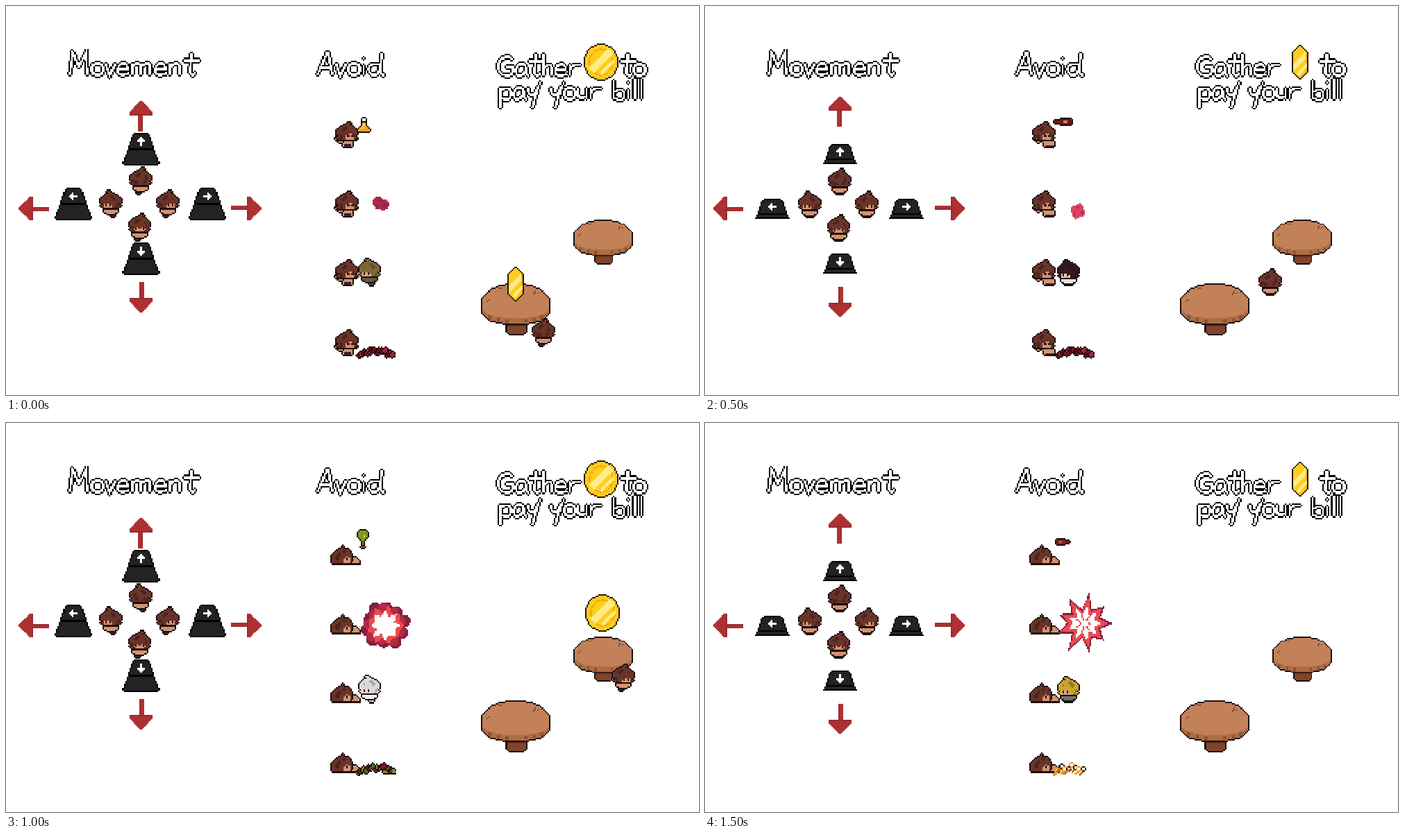
Write an HTML page with a canvas that moves like this. It is 998 px wide and 561 px high and loops after 1600 ms.

```html
<!DOCTYPE html>
<html lang="en">
<head>
<meta charset="utf-8">
<title>How to play</title>
<style>
  html, body { margin: 0; width: 100%; height: 100%; overflow: hidden; background: #fff; }
  canvas { display: block; }
</style>
</head>
<body>
<canvas id="stage" width="998" height="561">Movement. Avoid. Gather coins to pay your bill.</canvas>
<script>
const stage = document.getElementById('stage').getContext('2d');
const PIXEL = 998 / 480, STEP = 100, STEPS = 16;

// Rasterises vector layers [path, fill, edge, lineWidth] into hard pixels.
function sprite(w, h, layers) {
  const canvas = document.createElement('canvas');
  canvas.width = w;
  canvas.height = h;
  const g = canvas.getContext('2d');
  for (const [shape, fill, edge, line] of layers) {
    const path = new Path2D(shape), mask = new Uint8Array(w * h);
    const at = (x, y) => x >= 0 && x < w && mask[y * w + x];
    g.lineWidth = line || 1;
    for (let i = 0; i < w * h; i++) {
      const x = i % w + .5, y = Math.floor(i / w) + .5;
      mask[i] = line ? g.isPointInStroke(path, x, y) : g.isPointInPath(path, x, y);
    }
    for (let i = 0; i < w * h; i++) {
      const x = i % w, y = Math.floor(i / w);
      const near = at(x - 1, y) || at(x + 1, y) || at(x, y - 1) || at(x, y + 1);
      g.fillStyle = mask[i] ? fill : edge;
      if (mask[i] || (edge && near)) g.fillRect(x, y, 1, 1);
    }
  }
  return canvas;
}

// Draws a sprite centred on x, y.
function put(image, x, y, { turn = 0, flip = false, size = 1 } = {}) {
  const k = PIXEL * size;
  stage.save();
  stage.translate(x, y);
  stage.rotate(turn * Math.PI / 2);
  stage.scale(flip ? -k : k, k);
  stage.drawImage(image, -image.width / 2, -image.height / 2);
  stage.restore();
}

// Lettering: [advance, strokes], baseline at 18.
const glyphs = {
  M: [15, 'M1 18L3 3L7 12L12 3L13 18'],
  A: [12.5, 'M1 18L7 3H8L11 18M3 13H11'],
  G: [12, 'M10 7Q8 3 4 6T1 13Q2 18 7 18T11 12H6'],
  a: [10, 'M8 11Q3 8 1 14Q1 18 4 18T8 12Q7 18 10 18'],
  b: [9, 'M1 5V18M1 13Q8 9 8 15T1 17'],
  d: [13, 'M9 11Q2 9 1 14Q2 18 5 18T9 13M10 3L9 15Q9 18 12 18'],
  e: [10, 'M2 14H8Q8 10 5 10T1 14T5 18L9 17'],
  h: [9.5, 'M2 3V18M2 13Q7 8 8 13V18'],
  i: [4.5, 'M2 11V18M2 6V7'],
  l: [4.5, 'M2 4V18'],
  m: [16, 'M1 10V18M1 13Q4 8 7 11V18M7 13Q11 8 13 11V18'],
  n: [11, 'M1 10V18M1 13Q6 7 8 12V18'],
  o: [9.5, 'M5 10Q1 10 1 14T5 18T9 14T5 10'],
  p: [9, 'M1 10V24M1 12Q8 8 8 14T1 17'],
  r: [9, 'M1 10V18M1 14Q3 9 8 11'],
  t: [8, 'M5 3L4 16Q5 19 8 17M0 8H11'],
  u: [9, 'M1 10V15Q2 19 7 16V10V18'],
  v: [8.5, 'M1 10L4 18L8 10'],
  y: [9, 'M1 10Q1 16 5 15L8 10L4 24'],
  ' ': [7, '']
};

function lettering(text, left, top) {
  const path = new Path2D();
  let pen = 2;
  for (const letter of text) {
    const [advance, strokes] = glyphs[letter];
    path.addPath(new Path2D(strokes), new DOMMatrix([1, 0, 0, 1, pen, 0]));
    pen += advance;
  }
  const image = sprite(Math.ceil(pen) + 5, 28, [[path, '#fff', '#000', 1.6]]);
  return () => put(image, left + image.width * PIXEL / 2, top + image.height * PIXEL / 2);
}

const titles = [
  lettering('Movement', 86, 62), lettering('Avoid', 443, 62),
  lettering('Gather', 703, 63), lettering('to', 881, 63),
  lettering('pay your bill', 706, 97)
];

// People
const INK = '#1c0f0e';
const HEAD = 'M8 2L10 1H12L11 3L14 4L16 7V9L15 10L16 12L13 13H5L2 12L3 10L2 9V7L4 4L8 3Z';
function person({ hair, shade, skin, coat, legs }, view, walking) {
  const side = view === 'side';
  const feet = walking ? 'M6 16H9V19H6ZM9 16H12V17H9Z' : 'M6 16H12V18H6Z';
  const layers = [
    [feet, legs, INK],
    ['M5 12H13L14 15V16H12V17H6V16H4V15Z', coat, INK],
    [HEAD, hair, INK],
    ['M3 9L5 11L6 13H4ZM5 6L8 4L9 5L6 8ZM12 5L14 8V10L12 8Z', shade]
  ];
  if (view === 'back') layers.push(['M6 9L8 12H10L12 8L13 12H5Z', shade]);
  else layers.push(
    [side ? 'M8 8H14V12L13 13H8Z' : 'M5 8H13V12L11 13H7L5 12Z', skin],
    [side ? 'M7 7H15V9L12 10L11 9L9 11L7 10Z' : 'M5 7H13V11L11 9L9 11L7 9L5 11Z', hair],
    [side ? 'M9 10H10V12H9ZM12 10H13V12H12Z' : 'M6 10H7V12H6ZM11 10H12V12H11Z', '#371a18']);
  return sprite(18, 21, layers);
}

const poses = (look, view) => [true, false].map(walking => person(look, view, walking));
const look = (hair, shade, coat, legs = coat, skin = '#e0a47f') => ({ hair, shade, skin, coat, legs });
const heroLook = look('#6a3429', '#4b231f', '#d59270', '#3a211d', '#d59270');
const hero = {};
for (const view of ['front', 'back', 'side']) hero[view] = poses(heroLook, view);

const { hair: HAIR, shade: SHADE, skin: SKIN } = heroLook;
const fallen = sprite(22, 15, [
  ['M12 9H16L19 10L20 12V13H12Z', SKIN, INK],
  ['M1 12V8L3 5L6 3L9 1V3L12 3L14 5L15 8V11L13 13H2Z', HAIR, INK],
  ['M3 10L5 6L7 5L6 11ZM8 4L11 4L9 6Z', SHADE],
  ['M8 8H13L14 10V13H9Z', SKIN],
  ['M8 7H14V9L11 8L9 10L8 12Z', HAIR],
  ['M11 9H12V11H11Z', INK],
  ['M1 13H21V14H1Z', INK]
]);
function shocked(lean) {
  const body = lean ? 'M8 12H14L16 15V18H9Z' : 'M6 12H13V18H6Z';
  const arms = lean ? 'M2 12H6V15H4V13H2Z' : 'M1 11H4V13H6V15H3V13H1ZM13 13V11H16V13Z';
  return sprite(18, 21, [
    [body, SKIN, INK], [arms, SKIN, INK],
    [lean ? 'M10 17H16V18H10Z' : 'M7 16H12V18H7Z', '#3a211d'],
    [HEAD, HAIR, INK],
    ['M5 6L8 4L9 5L6 8ZM4 9L6 11L6 13H4Z', SHADE],
    ['M8 8H14V12L13 13H8Z', SKIN],
    ['M7 7H15V8L12 9L11 8L9 10L7 9Z', HAIR],
    ['M9 9H10V10H11V11H9ZM13 9H14V11H12V10H13Z', '#371a18']
  ]);
}
const victim = [shocked(false), shocked(true), fallen, fallen];
const guests = [
  look('#806638', '#64502e', '#625844', '#4e4638'),
  look('#35191f', '#25141a', '#e9e3df', '#cfc9c6', '#ecc8aa'),
  look('#dcdad8', '#aaa8a9', '#f1eeeb', '#d4d1d0', '#ead8cd'),
  look('#c8a52f', '#957721', '#6e7176', '#55585d')
].map(style => poses(style, 'side'));

function stand(pair, x, floor, step, flip) {
  const walking = step % 2 === 0;
  put(pair[walking ? 0 : 1], x, floor - 17.7 - (walking ? 2 : 0),
    { flip: step % 4 === 2 && pair === hero.back ? !flip : flip });
}

// Controls
const keyUp = sprite(26, 23, [
  ['M8 1H18L21 11L25 21V22H1V21L5 11Z', '#232323', '#000'], ['M5 11H21V12H5Z', '#000']]);
const keyDown = sprite(26, 23, [
  ['M7 9H19L22 18L23 21H3L4 18Z', '#232323', '#000'], ['M4 18H22V19H4Z', '#000'], ['M1 21H25V22H1Z', '#000']]);
const keyMark = sprite(5, 6, [['M2 0H3V1H4V2H5V3H3V6H2V3H0V2H1V1H2Z', '#fff']]);
const bigArrow = sprite(16, 22, [
  ['M8 0L16 8V10H9V21H6V10H0V8Z', '#ae3032'], ['M0 9H16V10H0ZM8 10H9V21H8Z', '#982b2f']]);

// Order: up, right, down, left
const pads = [
  { key: [194.5, 206.5], arrow: [194.5, 160], pose: ['back', 194, 273] },
  { key: [290, 285.5], arrow: [345, 292], pose: ['side', 233, 306] },
  { key: [194.5, 364.5], arrow: [194.5, 419], pose: ['front', 192.5, 340] },
  { key: [97, 285.5], arrow: [41, 292], pose: ['side', 151, 306, true] }
];

function drawPads(step) {
  const pressed = step % 8 > 3, push = pressed ? 6.5 : 0;
  pads.forEach(({ key: [kx, ky], arrow: [ax, ay], pose: [view, x, floor, flip] }, turn) => {
    const angle = turn * Math.PI / 2;
    put(bigArrow, ax + Math.sin(angle) * push, ay - Math.cos(angle) * push, { turn });
    put(pressed ? keyDown : keyUp, kx, ky);
    put(keyMark, kx, ky + (pressed ? 4 : -11), { turn });
    stand(hero[view], x, floor, step, flip);
  });
}

// Thrown bottles, each turning a quarter per step
const bottles = [
  [515.5, 172.5, sprite(12, 12, [
    ['M5 3H7V5L10 9V10H2V9L5 5Z', '#f2a31f', INK], ['M5 5H7V6H5ZM4 7H6V8H4Z', '#ffd667'], ['M5 1H7V3H5Z', '#fff', INK]])],
  [515.5, 167, sprite(6, 14, [
    ['M2 1H4V4L5 6V13H1V6L2 4Z', '#74151d', INK], ['M2 7H4V10H2Z', '#b78b65']])],
  [514, 167.5, sprite(9, 14, [
    ['M4 2H5V6L8 9V11L6 13H3L1 11V9L4 6Z', '#7f9a22', INK], ['M3 8H4V10H3Z', '#c0d352'], ['M3 1H6V2H3Z', '#8a5a3a', INK]])],
  [514.5, 171.5, sprite(5, 12, [
    ['M2 1H3V4L4 5V10H1V5L2 4Z', '#7c211c', INK], ['M2 6H3V8H2Z', '#c0653f']])]
];

// Debris on the floor
function debris(colors, count, width, hollow) {
  let seed = 7;
  const random = n => (seed = seed * 16807 % 2147483647) / 2147483647 * n;
  const layers = [];
  for (let i = 0; i < count; i++) {
    const x = 2 + (width - 6) * i / (count - 1), y = 8 - random(5) * Math.sin(Math.PI * (i + .5) / count);
    const color = colors[i % colors.length];
    if (hollow) layers.push([`M${x - 1} ${y + 2}L${x + 3} ${y - 2}`, color, '', 1.5],
      [`M${x + 1} ${y - 3}h2v2h-2z`, '#fff5dd', i % 2 ? INK : color]);
    else layers.push([`M${x} ${y}l${1 + random(2)} -2l2 3l-3 1z`, color, '#25070c']);
  }
  return sprite(width, 11, layers);
}
const piles = [
  [531, 498, debris(['#7d1728', '#a32438', '#5c1020'], 14, 29)],
  [531, 498, debris(['#4e6d22', '#7d1728', '#6f8c2c'], 15, 30)],
  [524, 500, debris(['#f09a22', '#c66c13'], 8, 24, true)]
];

// Explosions
const WINE = '#84203f', ROSE = '#b22a45', RED = '#eb4b50', WHITE = '#fff';
const around = (n, draw) => Array.from({ length: n }, (_, i) => draw(i, i * 2 * Math.PI / n)).join('');
const uneven = i => 1 + .1 * Math.sin(i * 2.3);
const puffs = (n, far, r) => around(n, (i, a) => {
  const d = far * uneven(i);
  return `M${24 + d * Math.cos(a + .4) - r} ${24 + d * Math.sin(a + .4)}a${r} ${r} 0 1 0 ${2 * r} 0a${r} ${r} 0 1 0 ${-2 * r} 0`;
});
const star = (n, outer, inner) => around(2 * n, (i, a) => {
  const r = (i % 2 ? inner : outer) * uneven(i);
  return `${i ? 'L' : 'M'}${24 + r * Math.cos(a)} ${24 + r * Math.sin(a)}`;
}) + 'Z';
const flower = k => [
  [puffs(6, 15.5 * k, 7 * k), WINE], [puffs(6, 15 * k, 5.5 * k), ROSE], [puffs(6, 14 * k, 4 * k), RED],
  [star(6, 14 * k, 7 * k), WHITE], [puffs(5, 7 * k, 2 * k), RED], [star(5, 4 * k, 1.5 * k), ROSE]];
const cloud = k => [
  [puffs(10, 17 * k, 5.5 * k), WINE], [puffs(9, 15.5 * k, 4.5 * k), ROSE],
  [star(9, 18 * k, 13 * k), RED], [star(8, 14 * k, 9 * k), WHITE]];
const spikes = k => [
  [star(9, 20 * k, 11 * k), WINE], [star(9, 17.5 * k, 9.5 * k), RED],
  [star(9, 12 * k, 6.5 * k), WHITE], [star(7, 8 * k, 2 * k), RED], [star(5, 4 * k, 2 * k), WHITE]];
const bubbles = k => [
  [puffs(7, 15 * k, 6 * k), WINE], [puffs(7, 14 * k, 4 * k), '#df4261'], [star(7, 12 * k, 8 * k), WHITE]];
const blasts = [
  [[540, 285, [[puffs(2, 2, 4), ROSE], [puffs(3, 3, 2), '#98284b']]],
   [539, 287, [[puffs(5, 6, 5), WINE], [puffs(4, 4, 3), RED]]], [537, 289, flower(.75)], [536, 290, flower(1)]],
  [[538, 294, [[puffs(2, 1.5, 2.5), ROSE]]],
   [537, 296, [[puffs(4, 2.8, 2.8), '#d94261'], [puffs(3, 3, 1), ROSE]]], [540, 293, bubbles(.7)], [541, 291, bubbles(1)]],
  [[547, 290, [['M19 27V24L22 21H26L29 24V27Z', '#a12b4d'], ['M23 23H26V24H23Z', ROSE]]],
   [546, 291, [[star(7, 11, 8), WINE], [star(6, 7, 4), RED]]], [546, 292, cloud(.75)], [546, 292, cloud(1)]],
  [[549, 284, [[star(6, 5, 2), WINE]]],
   [549, 284, [[star(9, 9.5, 5), '#9a284b'], [star(6, 4, 2), RED]]], [547, 287, spikes(.8)], [546, 289, spikes(1)]]
].map(phases => phases.map(([x, y, layers]) => [x, y, sprite(48, 48, layers)]));

function drawDangers(step) {
  const kind = Math.floor(step / 4), phase = step % 4;
  const lying = phase > 1;
  for (const floor of [206, 306, 405, 506])
    put(victim[phase], lying ? 490 : phase ? 488 : 491, lying ? floor - 15 : floor - 18.5);
  const [bx, by, bottle] = bottles[kind];
  put(bottle, bx, by, { turn: -phase });
  const [ex, ey, blast] = blasts[kind][phase];
  put(blast, ex, ey);
  stand(guests[kind], 523.5, 404.5, step, true);
  const [px, py, pile] = piles[step < 6 ? 0 : step < 11 ? 1 : 2];
  put(pile, px, py);
}

// Coins and tables
const GOLD = '#ffcd1f', DEEP = '#f0b010', PALE = '#ffec85', RIM = '#2b1a05';
const coinFaces = [
  sprite(26, 28, [
    ['M2 14A11 12 0 1 1 24 14A11 12 0 1 1 2 14Z', GOLD, RIM],
    ['M5 14A8 9 0 1 1 21 14A8 9 0 1 1 5 14Z', DEEP, '', 1.2],
    ['M5 18L18 5L21 8L8 22Z', PALE], ['M12 22L22 12L22 14L14 23Z', PALE]]),
  sprite(14, 28, [
    ['M7 2L12 8V20L7 26L2 20V8Z', GOLD, RIM],
    ['M11 7L12 8V20L7 26V25L11 20Z', DEEP],
    ['M2 16L11 7V11L2 20ZM5 22L12 15V17L6 23Z', PALE]])
];
const table = sprite(48, 37, [
  ['M18 28H31V33L29 35H20L18 33Z', '#80452b', INK],
  ['M18 28H31V30H18Z', '#5f301f'],
  ['M5 6Q12 1 24 1T43 6L47 11V20L43 25Q36 28 24 28T5 25L1 20V11Z', '#ad6d45', INK],
  ['M5 6Q12 1 24 1T43 6L47 11V18Q42 24 24 24T1 18V11Z', '#c28158'],
  ['M6 22V25M12 24V27M18 25V28M31 25V27M37 24V27M42 22V25M36 8L38 5M39 7L40 6M4 13L6 11M12 4L15 3', '#8c5334', '', 1]
]);

const route = [[0, 774, 492], [3, 799, 440], [5, 814, 418], [8, 845, 397], [11, 911, 384], [16, 1061, 384]];
function along(step) {
  const next = route.findIndex(([s]) => s > step);
  const [s0, x0, y0] = route[next - 1], [s1, x1, y1] = route[next];
  const k = (step - s0) / (s1 - s0);
  return [x0 + (x1 - x0) * k, y0 + (y1 - y0) * k];
}

function drawGoal(step) {
  put(table, 734, 438.5);
  put(table, 860, 341.5, { size: .865 });
  put(coinFaces[step % 2], 857, 81);
  if (step < 5) put(coinFaces[1 - step % 2], 734, 401 - 45 * step);
  if (step > 8 && step < 13) put(coinFaces[step % 2], 859, 319 - 45 * (step - 9));
  const [x, floor] = along(step);
  stand(step < 9 ? hero.back : hero.side, x, floor, step);
}

function draw(time) {
  const step = Math.floor(time / STEP) % STEPS;
  stage.fillStyle = '#fff';
  stage.fillRect(0, 0, 998, 561);
  stage.imageSmoothingEnabled = false;
  titles.forEach(title => title());
  drawPads(step);
  drawDangers(step);
  drawGoal(step);
  requestAnimationFrame(draw);
}
requestAnimationFrame(draw);
</script>
</body>
</html>
```
